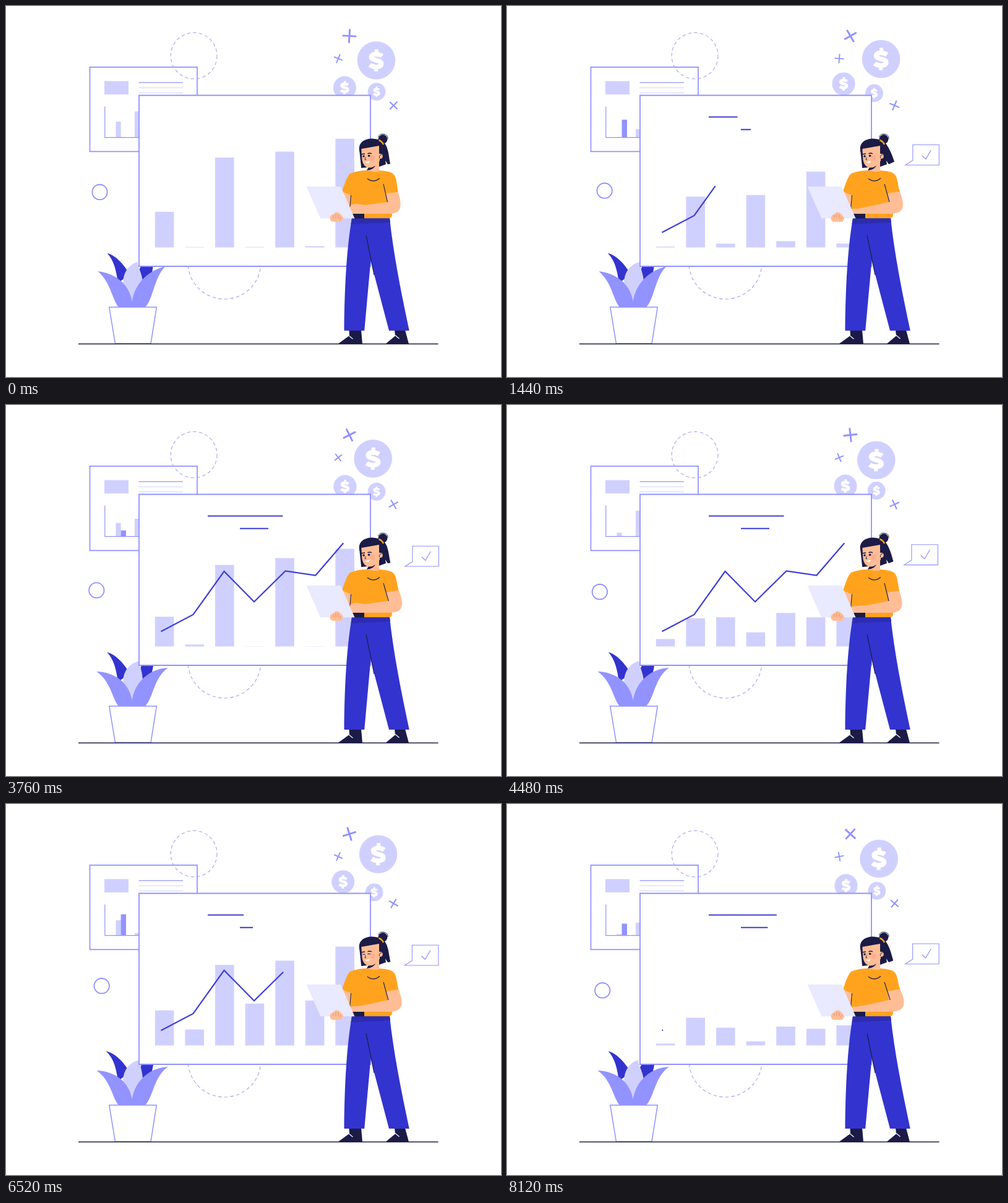
These frames come from a looping animation (800 px wide and 600 px high, 8.16 s). An HTML page with a canvas:

```html
<!DOCTYPE html>
<html lang="en">
<head>
<meta charset="utf-8">
<title>Analytics presentation</title>
<style>
html, body { margin: 0; width: 100%; height: 100%; overflow: hidden; background: #fff; }
canvas { display: block; }
</style>
</head>
<body>
<canvas id="stage" width="800" height="600"></canvas>
<script>
const ctx = document.getElementById('stage').getContext('2d');
const LOOP = 8160, STEP = 40, TAU = Math.PI * 2;
const LINE = '#9191ff', LIGHT = '#d0d0ff', MID = '#9393ff', BLUE = '#3333cf',
  INK = '#1b1b46', ORANGE = '#ffa31f', SKIN = '#ffbd95', STROKE = '#3e3ed3';

const clamp = (v, lo, hi) => Math.max(lo, Math.min(hi, v));

// Swings around mid and is highest at the time `peak`
const swing = (t, mid, amp, period, peak) => mid + amp * Math.cos(TAU * (t - peak) / period);

function path(d, fill, stroke, width = 1.2) {
  const p = new Path2D(d);
  if (fill) { ctx.fillStyle = fill; ctx.fill(p); }
  if (stroke) { ctx.strokeStyle = stroke; ctx.lineWidth = width; ctx.stroke(p); }
}

function circle(x, y, r, fill, stroke, width = 1.2) {
  ctx.beginPath();
  ctx.arc(x, y, r, 0, TAU);
  if (fill) { ctx.fillStyle = fill; ctx.fill(); }
  if (stroke) { ctx.strokeStyle = stroke; ctx.lineWidth = width; ctx.stroke(); }
}

function at(x, y, draw, { turn = 0, scale = 1 } = {}) {
  ctx.save();
  ctx.translate(x, y);
  ctx.rotate(turn * Math.PI / 180);
  ctx.scale(scale, scale);
  draw();
  ctx.restore();
}

function dashed(x, y, r) {
  ctx.setLineDash([5.5, 4.2]);
  circle(x, y, r, null, '#a3a3ee', 1.1);
  ctx.setLineDash([]);
}

function bar(t, x, w, base, color, max, period, peak) {
  const h = swing(t, max / 2, max / 2, period, peak);
  ctx.fillStyle = color;
  ctx.fillRect(x, base - h, w, h);
}

function coin(x, y, r) {
  at(x, y, () => {
    circle(0, 0, 30.8, LIGHT);
    path('M9.5-7C4-11-8-11.5-8-5.5C-8,1 8.3-1.5 8.3,5.5C8.3,12-5,11.5-10.5,7.2', null, '#fff', 7.6);
    path('M.5-18V-10M-.5,10V18', null, '#fff', 6);
  }, { scale: r / 30.8 });
}

function cross(x, y, r, width, turn) {
  at(x, y, () => path(`M${-r},0H${r}M0,${-r}V${r}`, null, LINE, width), { turn });
}

function panel(t) {
  path('M135.5,98.8H309V235.3H135.5Z', '#fff', LINE, 1.7);
  path('M159,121.5H198V143H159Z', LIGHT);
  path('M214.5,123.8H286', null, LINE, 1.2);
  path('M214.5,132.2H286M214.5,140.6H286', null, '#cfcfff', 1);
  bar(t, 177.5, 8.2, 212.5, LIGHT, 25.5, 3400, -70);
  bar(t, 185.6, 8.4, 212.5, MID, 37, 4760, 2190);
  bar(t, 208, 8.2, 212.5, LIGHT, 42, 4650, 0);
  path('M159.8,162.5V212.7H215', null, LINE, 1.2);
  dashed(303.6, 80.5, 37.4);
}

function floaters(t) {
  const dx = swing(t, 2, 5, 3440, 2120) + swing(t, 0, 3.7, 1720, 1518);
  const dy = swing(t, -.3, 4, 4000, 520);
  circle(150.5 + dx, 298.5 + dy, 12.2, '#fff', LINE, 1.8);
  coin(597.4 + dx, 85.6 + dy, 30.8);
  coin(swing(t, 546, 2, 4300, 3760), swing(t, 128.2, 4, 3900, 100), 18.6);
  coin(swing(t, 595.8, 3.2, 3800, 0), swing(t, 140.8, 2.4, 4400, 2500), 14.4);
  cross(555, 48.5, 11.3, 2.9, swing(t, -22, 26, 5500, 5300));
  cross(537, 85, 7.6, 1.9, swing(t, -8, 32, 6200, 300));
  cross(626.3, 160.8, 8.5, 2.1, swing(t, 7, 37, 7500, 100));
}

function plant(t) {
  const droop = clamp((t - 1440) / 1900, 0, 1);
  const back = 163 + swing(t, -.3, 1.1, 4000, 520);
  const mid = swing(t, 0, 2, 2800, 900);
  const lx = 148.5 - 2 * droop, rx = 257 + 5 * droop;
  const ly = 429 + 2 * droop, ry = 421.5 + 3.5 * droop;
  path(`M${back},399.7C177,403 191,418 200,434L181,448C178,428 175,412 ${back},399.7Z`, BLUE);
  path(`M${216 + mid * .6},426L222,413H${238 + droop}C238,428 234,438 232,446H221Z`, BLUE);
  path(`M${213.5 + mid},414C196,419 188,434 189.5,452L204,482L221,452C222,436 ${215 + mid},426 ${213.5 + mid},414Z`, LIGHT);
  path(`M${lx},${ly}C174,432 199,447 204,479V487H182C171,474 170,448 ${lx},${ly}Z`, MID);
  path(`M${rx},${ry}C234,426 208,446 203.5,479V487H225C238,474 239,440 ${rx},${ry}Z`, MID);
  path('M166.8,487H243.3L234,546H176.5Z', '#fff', LINE, 1.5);
}

function board(t) {
  path('M215,144.5H589V421H215Z', '#fff', LINE, 1.8);
  // Neighbouring bars move against each other: [height, period, peak]
  [
    [58, 3380, -80], [87, 3650, 1715], [146, 3480, -70], [95, 3950, 1860],
    [155, 3450, 0], [132, 3850, 1770], [177, 3480, -90]
  ].forEach((wave, i) => bar(t, 240.8 + 48.6 * i, 30.6, 390.5, LIGHT, ...wave));

  const local = t % 4720;
  const first = clamp(local * .0323, 0, 121.5);
  const second = clamp((local - 300) * .014, 0, 46);
  if (first) path(`M326,179.5h${first}`, null, STROKE, 2.1);
  if (second) path(`M378,199.8h${second}`, null, STROKE, 2.1);

  const start = [8108, 4615, 640].find(s => t >= s);
  if (start) {
    ctx.setLineDash([clamp((t - start) * .147, 0, 403), 999]);
    path('M250.5,366.3L302.5,339L352.5,269L401,318.2L451.5,268.5L500.3,275.5L545.3,223.3', null, STROKE, 2.2);
    ctx.setLineDash([]);
  }
}

function bubble(t) {
  if (t < STEP) return;
  at(swing(t, .3, 2, 2600, 900), swing(t, 1.7, 2.2, 3700, 3300), () => {
    path('M655,250L643,257.8H697.5V225H655Z', '#fff', LINE, 1.1);
    path('M670,242.5L676,248L684.5,233.5', null, LINE, 1.3);
  });
}

function legs() {
  path('M536.5,546.5L555,533L554.5,524H574L576,546.5Z', INK);
  path('M613.5,546.5L629,533.5L628,524H645L651,546.5Z', INK);
  path('M554.5,533.5L560.5,538.5M629,532.5L635.5,538', null, '#fff', 1.2);
  path('M559,343C550,395 547,460 546.5,525H579.2L589.5,411L595,434L619,525H651.7C638,460 626,400 620,343Z', BLUE);
  path('M559,343H620L621,350L557.5,353Z', '#2c2cb2');
  path('M582,371L595,435', null, INK, 1.2);
}

function head(t) {
  const flick = swing(t, 0, 2.8, 3700, 1440);
  const tip = 623.3 + flick, rise = 253.8 - flick * .7;
  path(`M571,232L574.2,262L584,261L600,254L603,260L614,256L613,250L617,256L${tip},${rise}C${tip - 3},243 619,231 611,221Z`, INK);
  path('M586,256L603,248V264Q606,268 598,268L583,266Z', SKIN);
  path('M583,266Q595,265 598,256L586,261Z', INK);
  path('M574.2,230L604,225V250Q599,261 587,261.5Q577.5,261 575.5,249Z', SKIN);
  circle(604.8, 243, 4, SKIN);
  path('M607,240.5Q602.5,241 603.5,246', null, INK, .9);
  path('M571.5,236C568,222 578,214.5 592,214.5C605,215 613,221 616,230L603,239V226L574.5,231Z', INK);
  circle(609, 215.5, 7.4, INK);
  path('M601.5,212Q603,206.5 610,207Q618,208.5 617,215', null, INK, .9);
  path('M602.5,217Q607.5,218.5 610,224', null, ORANGE, 2.4);

  circle(592.3, 246, 4, '#ffab8c');
  path('M574.8,239.8L580,239M584.5,238.8Q588,237 591,239', null, INK, 1.5);
  const blink = t % 1280;
  if (blink >= 80 && blink < 160) {
    path('M576,243L580,243.3M584.3,242.5H589', null, INK, 1.2);
  } else {
    circle(578, 243, 1.7, INK);
    circle(586.6, 242.3, 1.8, INK);
  }
  path('M581.2,244.5L580,248.7H582.2', null, INK, .9);
  path('M580.5,252.3Q584,251.5 588,250.5Q586,256.5 580.5,252.3Z', '#fff');
}

function body(t) {
  const elbow = swing(t, 2, 2, 5240, 2620);
  const tap = swing(t, 4, -4, 418, 0);
  const cuff = `${633.8 + elbow * .4},${301 - elbow * .4}`;
  path('M543,299L557,305L556,325L547,314Z', SKIN);
  path('M560,336H580V343.5H560Z', INK);
  path(`M556,271C566,267 575,266 583,266L598,268L604,266C615,267 625,268 628.5,275C632,282 632,292 ${cuff}L617,304L624,337Q624,343.2 619,343.2H579V336H555.5L557.5,306L543,300C547,288 550,278 556,271Z`, ORANGE);
  path('M588,265H601L604,266.5Q598,269.5 588,266Z', SKIN);
  path('M584,279Q593.5,287 604,278.5', null, INK, 1.1);
  path('M557.5,306L555.5,330', null, INK, 1.1);
  path(`M614,303L${cuff}C${636 + elbow},309 ${639 + elbow},318 ${637 + elbow},326C${635 + elbow},334 627,336.5 618,336H560L555,${328 + tap * .6}Q556,${319 + tap} 567,${320 + tap}L581,${322 + tap * .4}L617,317Z`, SKIN);
  path(`M610,288L${616.5 + elbow * .7},317`, null, INK, 1.1);
  path('M485.5,292H541L563.5,343.5H508.3Z', '#e9e9ff');
  path('M523.5,343Q524,338 529,337Q531,333.5 534,333.5Q538,333 539.5,336Q544,339 545.2,344L542,349H528Q523.5,348 523.5,343Z', SKIN);
  path('M529,338V343M533,336.5V343M537,337V343M541,341L539.5,345', null, '#d98f70', .9);
}

function draw(t) {
  ctx.fillStyle = '#fff';
  ctx.fillRect(0, 0, 800, 600);
  panel(t);
  dashed(353, 415, 59);
  floaters(t);
  plant(t);
  board(t);
  bubble(t);
  path('M117,546.4H698.5', null, INK, 1.5);
  legs();
  body(t);
  head(t);
}

const begin = performance.now();
function frame() {
  const t = (performance.now() - begin) % LOOP;
  draw(Math.floor(t / STEP) * STEP);
  requestAnimationFrame(frame);
}
frame();
</script>
</body>
</html>
```
